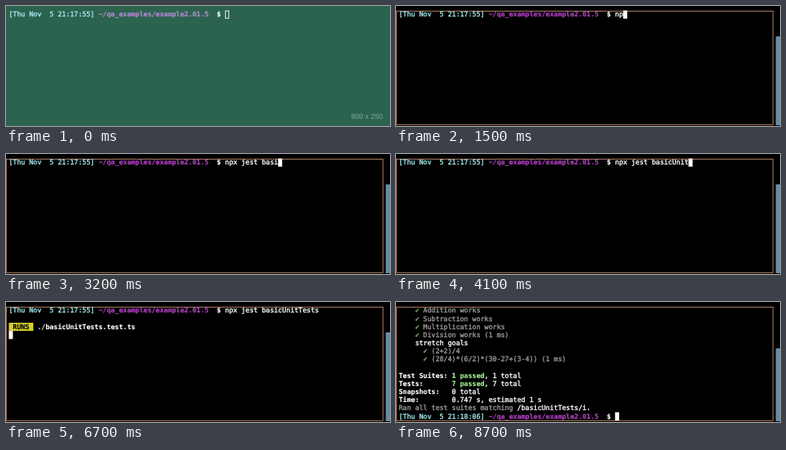
These frames come from a looping animation (480 px wide and 150 px high, 8.8 s). An HTML page with a canvas:

```html
<!DOCTYPE html>
<html lang="en">
<head>
<meta charset="utf-8">
<title>Terminal test run</title>
<style>
  html, body { margin: 0; width: 100%; height: 100%; overflow: hidden; background: #000; }
  canvas { display: block; }
</style>
</head>
<body>
<canvas id="stage" width="480" height="150"></canvas>
<script>
const ctx = document.getElementById('stage').getContext('2d');
const LOOP = 8800;
const LEFT = 3.5, TOP = 5.6, CELL = 5.1, ROW = 10.17;
const WHITE = '#fff', CYAN = '#a6e8ea', MAGENTA = '#b444c4', GRAY = '#9a9a9a',
      GREEN = '#9df48a', CHECK = '#86c878', YELLOW = '#d6ce30';

const command = 'npx jest basicUnitTests';
const keyTimes = [1300, 1500, 1600, 1900, 2300, 2400, 2500, 2600, 2700, 2900, 3100, 3100,
                  3200, 3300, 3600, 3800, 3900, 4000, 4300, 4400, 4500, 4600, 4700];
const FOCUS = 500, ENTER = 4900, RUN = 5900, RESULT = 6800, PROMPT = 6900;

const colX = col => LEFT + col * CELL;
const rowY = row => TOP + row * ROW;

// Each part is [text, colour, bold, background]; returns the column after the last one.
function line(row, parts, col = 0) {
  const y = rowY(row) + 7.75;
  for (const [text, color, bold, back] of parts) {
    if (back) {
      ctx.fillStyle = back;
      ctx.fillRect(colX(col), rowY(row), text.length * CELL, ROW);
    }
    ctx.fillStyle = ctx.strokeStyle = color;
    ctx.lineWidth = bold ? .15 : .35;   // slightly heavier strokes, as on a smoothed display
    ctx.font = `${bold ? 'bold ' : ''}8.47px "DejaVu Sans Mono", monospace`;
    for (const ch of text) {
      const x = colX(col++);
      ctx.fillText(ch, x, y);
      ctx.strokeText(ch, x, y);
    }
  }
  return col;
}

function cursor(col, row, hollow) {
  const x = colX(col), y = rowY(row);
  ctx.fillStyle = ctx.strokeStyle = WHITE;
  ctx.lineWidth = .9;
  if (hollow) ctx.strokeRect(x + .5, y + .5, CELL - 1, ROW - 1);
  else ctx.fillRect(x, y, CELL, ROW);
}

function prompt(row, clock, pathColor = MAGENTA) {
  return line(row, [
    [`[Thu Nov  5 ${clock}] `, CYAN],
    ['~/qa_examples/example2.01.5', pathColor, true],
    ['  $ ', WHITE, true]
  ]);
}

const check = (indent, text) => [[' '.repeat(indent) + '✓ ', CHECK], [text, GRAY]];
const passed = (label, n) =>
  [[label.padEnd(13), WHITE, true], [n + ' passed', GREEN, true], [`, ${n} total`, WHITE]];

const results = [
  check(4, 'Addition works'),
  check(4, 'Subtraction works'),
  check(4, 'Multiplication works'),
  check(4, 'Division works (1 ms)'),
  [['    stretch goals', WHITE]],
  check(6, '(2+2)/4'),
  check(6, '(28/4)*(6/2)*(30-27+(3-4)) (1 ms)'),
  [],
  passed('Test Suites:', 1),
  passed('Tests:', 7),
  [['Snapshots:   ', WHITE, true], ['0 total', WHITE]],
  [['Time:        ', WHITE, true], ['0.747 s, estimated 1 s', WHITE]],
  [['Ran all test suites matching ', GRAY], ['/basicUnitTests/i.', WHITE]]
];

function frame(t) {
  const intro = t < 100, done = t >= RESULT;
  ctx.fillStyle = intro ? '#2c634f' : '#000';
  ctx.fillRect(0, 0, 480, 150);

  if (intro) {
    ctx.fillStyle = '#84a99b';
    ctx.font = '9px "Liberation Sans", Arial, sans-serif';
    ctx.fillText('800 x 250', 431.5, 141);
  }
  if (t >= FOCUS) {
    ctx.strokeStyle = '#b08064';
    ctx.lineWidth = 1;
    ctx.strokeRect(.4, 6.4, 470.8, 142);
    const y = done ? 58 : 38;
    ctx.fillStyle = '#668ca2';
    ctx.fillRect(474.7, y, 5.3, 149 - y);
  }

  if (done) {
    results.forEach((parts, row) => line(row, parts));
    cursor(t < PROMPT ? 0 : prompt(13, '21:18:06'), 13);
    return;
  }
  const typed = command.slice(0, keyTimes.filter(k => k <= t).length);
  const end = line(0, [[typed, WHITE]], prompt(0, '21:17:55', intro ? '#b48bd3' : MAGENTA));
  if (t >= RUN) {
    line(2, [[' RUNS ', '#000', true, YELLOW], [' ./', '#ccc'],
             ['basicUnitTests.test.ts', WHITE, true]]);
    cursor(0, 3);
  } else if (t >= ENTER) cursor(0, 1);
  else cursor(end, 0, t < FOCUS);
}

ctx.textRendering = 'geometricPrecision';
const start = performance.now();
function tick() {
  frame((performance.now() - start) % LOOP);
  requestAnimationFrame(tick);
}
tick();
</script>
</body>
</html>
```
